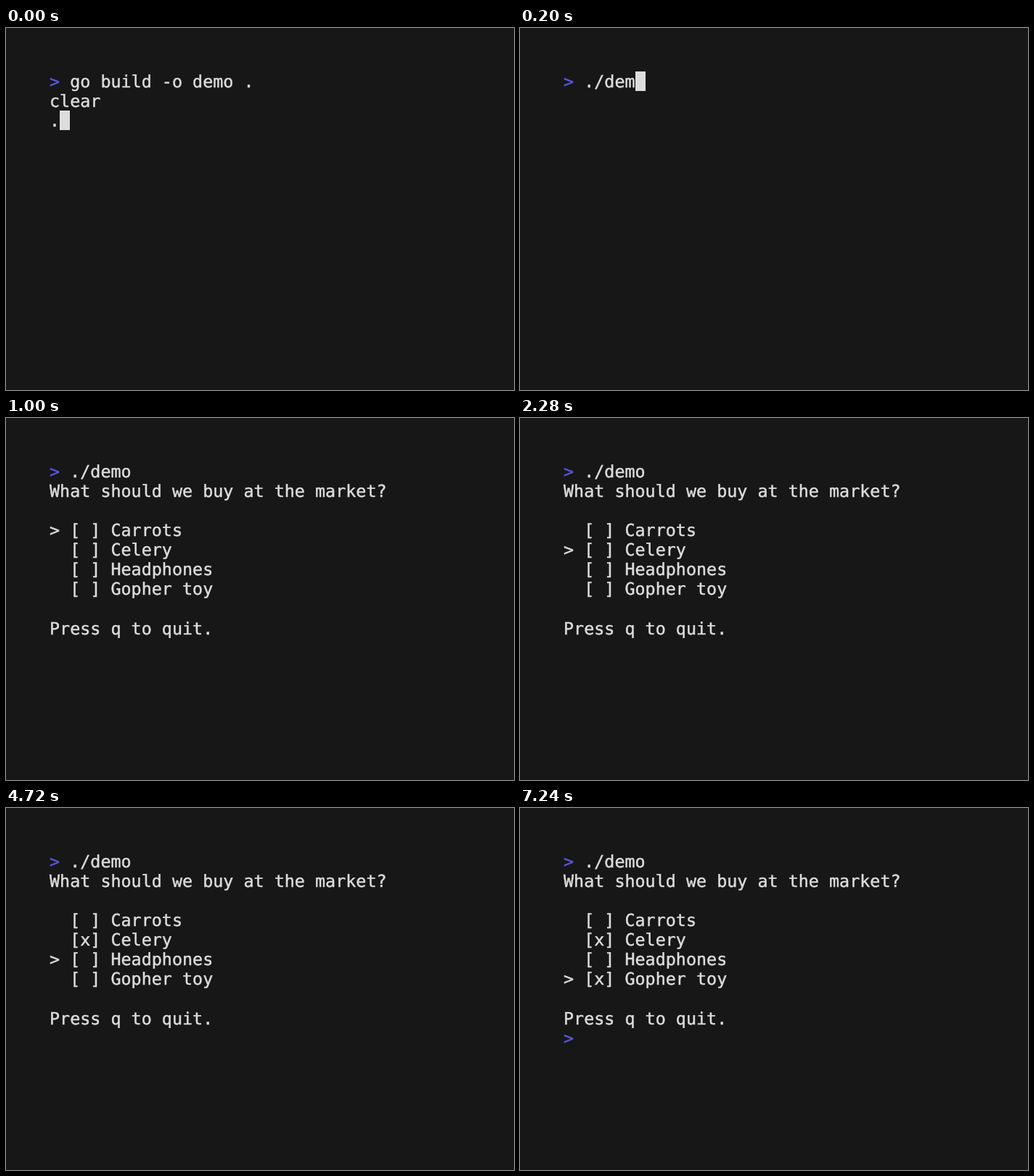
Recreate the animation shown at these times as an HTML page. Size 700 px wide and 500 px high, loop 7640 ms.

```html
<!DOCTYPE html>
<html lang="en">
<head>
<meta charset="utf-8">
<title>Terminal shopping list</title>
<style>
  :root { --w: 14.08px; --h: 27.125px; --drop: .6px; --loop: 7640ms; }
  html, body { margin: 0; width: 100%; height: 100%; overflow: hidden; background: #171717; }
  #term {
    position: absolute; left: 60px; top: calc(60px + var(--drop));
    color: #ddd;
    font: 23.333px/var(--h) "DejaVu Sans Mono", monospace;
    letter-spacing: .033px;
    font-variant-ligatures: none;
    text-rendering: geometricPrecision;
    -webkit-text-stroke: .45px;
  }
  /* --x and --y count character cells */
  #term > * {
    position: absolute; margin: 0; font: inherit; white-space: pre;
    left: calc(var(--x, 0) * var(--w));
    top: calc(var(--y, 0) * var(--h));
    animation: var(--loop) step-end infinite;
  }
  .prompt { color: #5a56e0; }
  .clip { overflow: hidden; height: var(--h); }
  #term > #cursor {
    width: var(--w); height: var(--h); margin-top: calc(-1 * var(--drop));
    background: #ddd;
  }

  #term > .boot { animation-name: boot; }
  #term > #slash { animation-name: slash; }
  #term > #typed { animation-name: typed; }
  #term > #cursor { animation-name: cursor; }
  #term > #menu { animation-name: menu; }
  #term > #arrow { animation-name: arrow; }
  #term > #celery { animation-name: celery; }
  #term > #gopher { animation-name: gopher; }
  #term > #done { animation-name: done; }

  @keyframes boot { 0% { visibility: visible } 1.57%, 100% { visibility: hidden } }
  @keyframes slash { 0% { visibility: hidden } .52% { visibility: visible } 1.57%, 100% { visibility: hidden } }
  @keyframes typed {
    0% { width: 0 }
    1.57% { width: calc(3 * var(--w)) }
    2.09% { width: calc(4 * var(--w)) }
    2.61% { width: calc(5 * var(--w)) }
    3.14%, 100% { width: calc(6 * var(--w)) }
  }
  @keyframes cursor {
    0% { --x: 1; --y: 2; visibility: visible }
    .52% { --x: 2; --y: 2; visibility: visible }
    1.57% { --x: 5; --y: 0; visibility: visible }
    2.09% { --x: 6; --y: 0; visibility: visible }
    2.61% { --x: 7; --y: 0; visibility: visible }
    3.14% { --x: 8; --y: 0; visibility: visible }
    4.18% { --x: 0; --y: 1; visibility: visible }
    11.51% { --x: 0; --y: 9; visibility: hidden }
    86.91% { --x: 0; --y: 9; visibility: visible }
    87.43% { --x: 2; --y: 9; visibility: visible }
    94.76%, 100% { --x: 2; --y: 9; visibility: hidden }
  }
  @keyframes menu { 0% { visibility: hidden } 13.08%, 100% { visibility: visible } }
  @keyframes arrow {
    0% { --y: 3; visibility: hidden }
    13.08% { --y: 3; visibility: visible }
    29.84% { --y: 4; visibility: visible }
    36.12% { --y: 5; visibility: visible }
    42.4% { --y: 4; visibility: visible }
    61.78% { --y: 5; visibility: visible }
    68.06%, 100% { --y: 6; visibility: visible }
  }
  @keyframes celery { 0% { visibility: hidden } 49.21%, 100% { visibility: visible } }
  @keyframes gopher { 0% { visibility: hidden } 74.34%, 100% { visibility: visible } }
  @keyframes done { 0% { visibility: hidden } 87.43%, 100% { visibility: visible } }
</style>
</head>
<body>
<div id="term">
  <span class="prompt">&gt;</span>
  <span class="boot" style="--x:2">go build -o demo .</span>
  <span class="boot" style="--y:1">clear</span>
  <span class="boot" style="--y:2">.</span>
  <span id="slash" style="--x:1;--y:2">/</span>
  <span id="typed" class="clip" style="--x:2">./demo</span>
  <pre id="menu" style="--y:1">What should we buy at the market?

  [ ] Carrots
  [ ] Celery
  [ ] Headphones
  [ ] Gopher toy

Press q to quit.</pre>
  <span id="arrow">&gt;</span>
  <span id="celery" style="--x:3;--y:4">x</span>
  <span id="gopher" style="--x:3;--y:6">x</span>
  <span id="done" class="prompt" style="--y:9">&gt;</span>
  <span id="cursor"></span>
</div>
</body>
</html>
```
